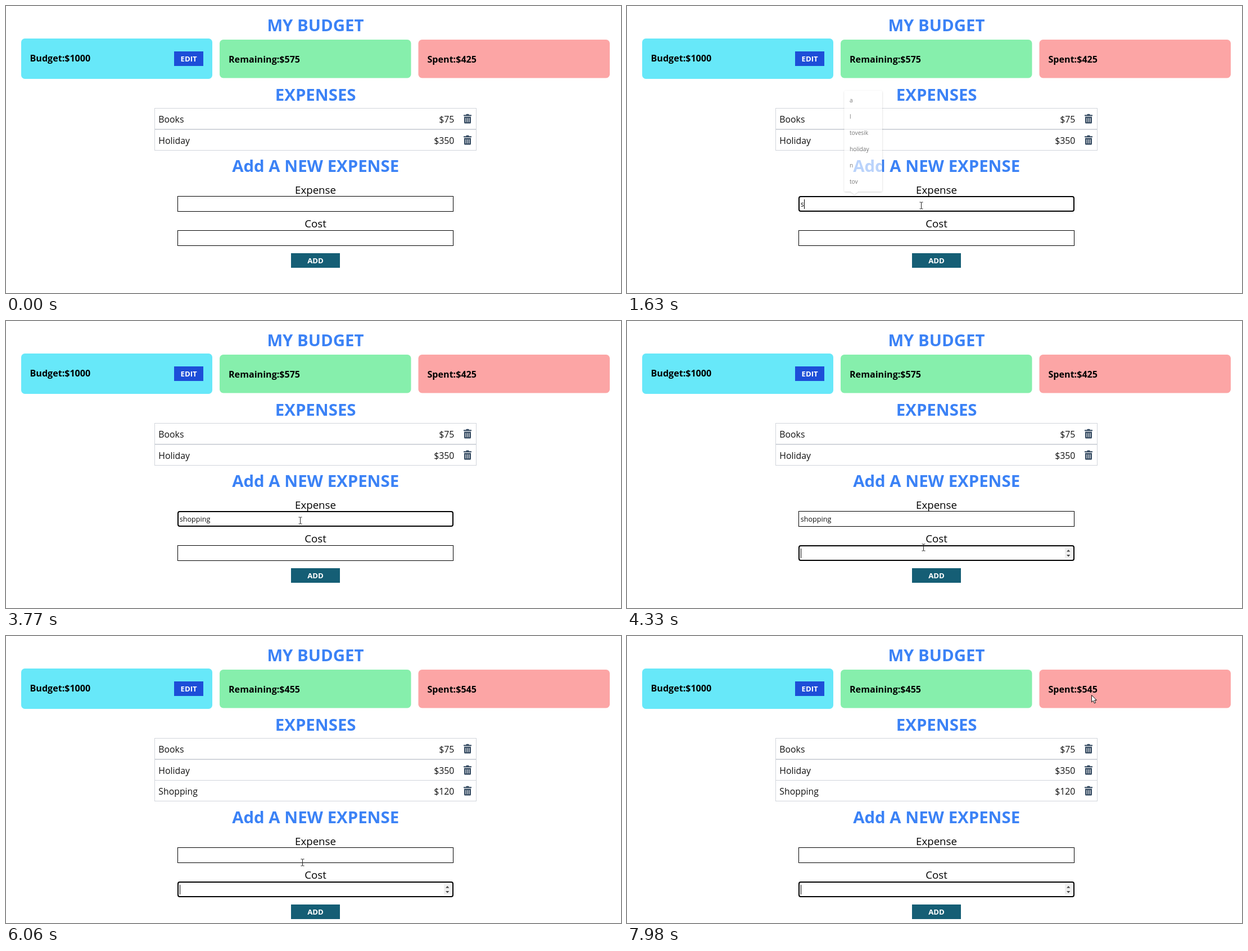
An HTML page for the animation above (8000 ms loop, 1094 by 512 pixels).

```html
<!DOCTYPE html>
<html lang="en">
<head>
<meta charset="utf-8">
<title>My budget</title>
<style>
  html, body { margin: 0; width: 100%; height: 100%; overflow: hidden; background: #fff; }
  svg { display: block; width: 100%; height: 100%; font-family: "Open Sans", "Noto Sans", sans-serif; }
  .title { font-weight: 700; font-size: 29.4px; fill: #3b82f6; text-anchor: middle; }
  .card { font-weight: 700; font-size: 16.1px; }
  .button { font-weight: 700; font-size: 13.2px; fill: #fff; text-anchor: middle; }
  .label { font-size: 18.7px; text-anchor: middle; }
  .row { font-size: 15.8px; fill: #111; }
  .typed { font-size: 12.6px; fill: #111; }
  .hint { font-size: 10.2px; fill: #333; }
  .end { text-anchor: end; }
</style>
</head>
<body>
<svg viewBox="0 0 1094 512" xmlns="http://www.w3.org/2000/svg">
  <defs>
    <g id="trash">
      <path fill="#334960" fill-rule="evenodd" d="M814 1.8h4l1-1.6h4l1 1.6h4v2h-14zM815 5h12v10.5q0 1.5-1.5 1.5h-9q-1.5 0-1.5-1.5zM817.4 7.2v7.6h1.1V7.2zM820.5 7.2v7.6h1.1V7.2zM823.5 7.2v7.6h1.1V7.2z"/>
    </g>
    <filter id="shadow" x="-20%" y="-10%" width="140%" height="120%">
      <feDropShadow dx="0" dy="1" stdDeviation="1.6" flood-opacity=".28"/>
    </filter>
  </defs>

  <text class="title" x="550.5" y="44.5">MY BUDGET</text>
  <rect x="27" y="58" width="340" height="72" rx="6.5" fill="#67e8f9"/>
  <rect x="380" y="60" width="340.5" height="68.5" rx="6.5" fill="#86efac"/>
  <rect x="733.5" y="60" width="340.5" height="68.5" rx="6.5" fill="#fca5a5"/>
  <text class="card" x="42.5" y="99">Budget:$1000</text>
  <text class="card" x="396" y="101" id="remaining"></text>
  <text class="card" x="749.5" y="101" id="spent"></text>
  <rect x="299" y="81" width="52" height="26" fill="#1d4ed8"/>
  <text class="button" x="325.2" y="99">EDIT</text>

  <text class="title" x="550.7" y="168.5">EXPENSES</text>
  <g id="rows"></g>

  <g id="form">
    <text class="title" x="550.7" y="296">Add A NEW EXPENSE</text>
    <text class="label" x="550.5" y="334.5">Expense</text>
    <rect id="nameBox" fill="#fff" stroke="#000"/>
    <text class="typed" id="name" x="308.7" y="358.3"></text>
    <text class="label" x="550.5" y="395">Cost</text>
    <rect id="costBox" fill="#fff" stroke="#000"/>
    <text class="typed" id="cost" x="308.7" y="418.8"></text>
    <g id="spinner">
      <rect x="779" y="405" width="12.5" height="18" fill="#efefef"/>
      <path fill="#444" d="M782 411.5l3.2-3.6 3.2 3.6zM782 417l3.2 3.6 3.2-3.6z"/>
    </g>
    <rect id="caret" width="1" height="17"/>
    <rect x="507" y="441" width="87" height="26" fill="#155e75"/>
    <text class="button" x="550.5" y="458.8">ADD</text>
  </g>

  <g id="popup">
    <path filter="url(#shadow)" fill="#fff" d="M388.5 151h63.5q2 0 2 2v176q0 2-2 2h-41l-6.500 5-6.500-5h-9.500q-2 0-2-2v-176q0-2 2-2z"/>
  </g>

  <path id="arrow" fill="#fff" stroke="#111" stroke-linejoin="round" d="M.5.5v12.500l2.900-2.700 2 4.700 2.200-1-2-4.500h3.700z"/>
  <path id="beam" fill="none" stroke="#222" d="M-3-6h2q1 0 1 1v10q0 1-1 1h-2M3-6h-2q-1 0-1 1v10q0 1 1 1h2"/>
</svg>
<script>
const LOOP = 8000, STEP = 70, ROW_SHIFT = 38;
const FOCUS_NAME = 830, FOCUS_COST = 4330, SUBMIT = 6060;
const $ = id => document.getElementById(id);
const SVG = "http://www.w3.org/2000/svg";

const nameKeys = [1560, 2040, 2300, 2430, 2560, 2890, 3170, 3240];
const costKeys = [5130, 5460, 5660];

// Spans in which the caret is hidden while a field has focus
const caretOff = [[0, FOCUS_NAME], [1360, 1560], [3770, FOCUS_COST], [4860, 5130], [6190, 6740], [7240, 7740]];

const easeOut = u => 1 - (1 - u) ** 2;
const smooth = u => u * u * (3 - 2 * u);
const moves = [
  { start: 130, end: 760, from: [959, 489], to: [523, 356], ease: easeOut },
  { start: 3770, end: 4260, from: [523, 356], to: [527, 404], ease: smooth },
  { start: 6670, end: 7020, from: [527, 404], to: [752, 300], ease: smooth },
  { start: 7020, end: 7300, from: [752, 300], to: [766, 275], ease: easeOut },
  { start: 7430, end: 7980, from: [766, 275], to: [826, 105], ease: smooth }
];

function add(parent, tag, attrs, text = "") {
  const node = document.createElementNS(SVG, tag);
  for (const key in attrs) node.setAttribute(key, attrs[key]);
  node.textContent = text;
  return parent.appendChild(node);
}

function addRow(index, label, price) {
  const top = Math.round(182 + index * 37.6);
  const row = add($("rows"), "g", {});
  add(row, "rect", { x: 264.5, y: top + .5, width: 572, height: 37, fill: "none", stroke: "#d1d5db" });
  add(row, "text", { class: "row", x: 271.3, y: top + 25.6 }, label);
  add(row, "text", { class: "row end", x: 797.3, y: top + 25.6 }, price);
  add(row, "use", { href: "#trash", y: top + 10.500 });
  return row;
}

addRow(0, "Books", "$75");
addRow(1, "Holiday", "$350");
const newRow = addRow(2, "Shopping", "$120");

["a", "l", "tovesik", "holiday", "n", "tov"].forEach((word, i) =>
  add($("popup"), "text", { class: "hint", x: 396, y: 172 + i * 28.9 }, word));

function show(id, visible) {
  $(id).setAttribute("visibility", visible ? "visible" : "hidden");
}

function typed(word, keys, t) {
  return t >= SUBMIT ? "" : word.slice(0, keys.filter(k => k <= t).length);
}

function drawBox(id, y, focused) {
  const inset = focused ? 1 : .5;
  const attrs = {
    x: 305 + inset, y: y + inset, width: 491 - 2 * inset, height: 28 - 2 * inset,
    rx: focused ? 3 : 0, "stroke-width": focused ? 2 : 1
  };
  for (const key in attrs) $(id).setAttribute(key, attrs[key]);
}

function pointerAt(t) {
  const move = moves.filter(m => m.start <= t).pop();
  if (!move) return null;
  const { start, end, from, to, ease } = move;
  const stepped = start + Math.floor((t - start) / STEP) * STEP;
  const u = t >= end ? 1 : ease((stepped - start) / (end - start));
  return from.map((a, i) => Math.round(a + (to[i] - a) * u));
}

function popupOpacity(t) {
  if (t < FOCUS_NAME || t >= 1770) return 0;
  if (t < 900) return .5;
  if (t < 1560) return 1;
  return t < 1630 ? .9 : t < 1700 ? .65 : .3;
}

function render(t) {
  const added = t >= SUBMIT, shift = added ? ROW_SHIFT : 0;
  const onName = t >= FOCUS_NAME && t < FOCUS_COST, onCost = t >= FOCUS_COST;

  $("remaining").textContent = "Remaining:$" + (added ? 455 : 575);
  $("spent").textContent = "Spent:$" + (added ? 545 : 425);
  newRow.setAttribute("visibility", added ? "visible" : "hidden");
  $("form").setAttribute("transform", `translate(0 ${shift})`);

  $("name").textContent = typed("shopping", nameKeys, t);
  $("cost").textContent = typed("120", costKeys, t);
  drawBox("nameBox", 339, onName);
  drawBox("costBox", 400, onCost);

  const field = $(onCost ? "cost" : "name");
  const width = field.textContent ? field.getComputedTextLength() : 0;
  $("caret").setAttribute("x", Math.round(308.9 + width));
  $("caret").setAttribute("y", onCost ? 406 : 345);
  show("caret", !caretOff.some(([a, b]) => t >= a && t < b));

  $("popup").setAttribute("opacity", popupOpacity(t));

  const pointer = pointerAt(t);
  const over = top => !!pointer && pointer[0] >= 305 && pointer[0] < 796 &&
    pointer[1] >= top + shift && pointer[1] < top + shift + 28;
  const overField = over(339) || over(400);
  show("arrow", pointer && !overField);
  show("beam", overField);
  show("spinner", onCost || over(400));
  if (pointer) {
    const [x, y] = pointer;
    $("arrow").setAttribute("transform", `translate(${x} ${y})`);
    $("beam").setAttribute("transform", `translate(${x + .5} ${y})`);
  }
}

const begin = performance.now();
function tick() {
  render((performance.now() - begin) % LOOP);
  requestAnimationFrame(tick);
}
tick();
</script>
</body>
</html>
```
